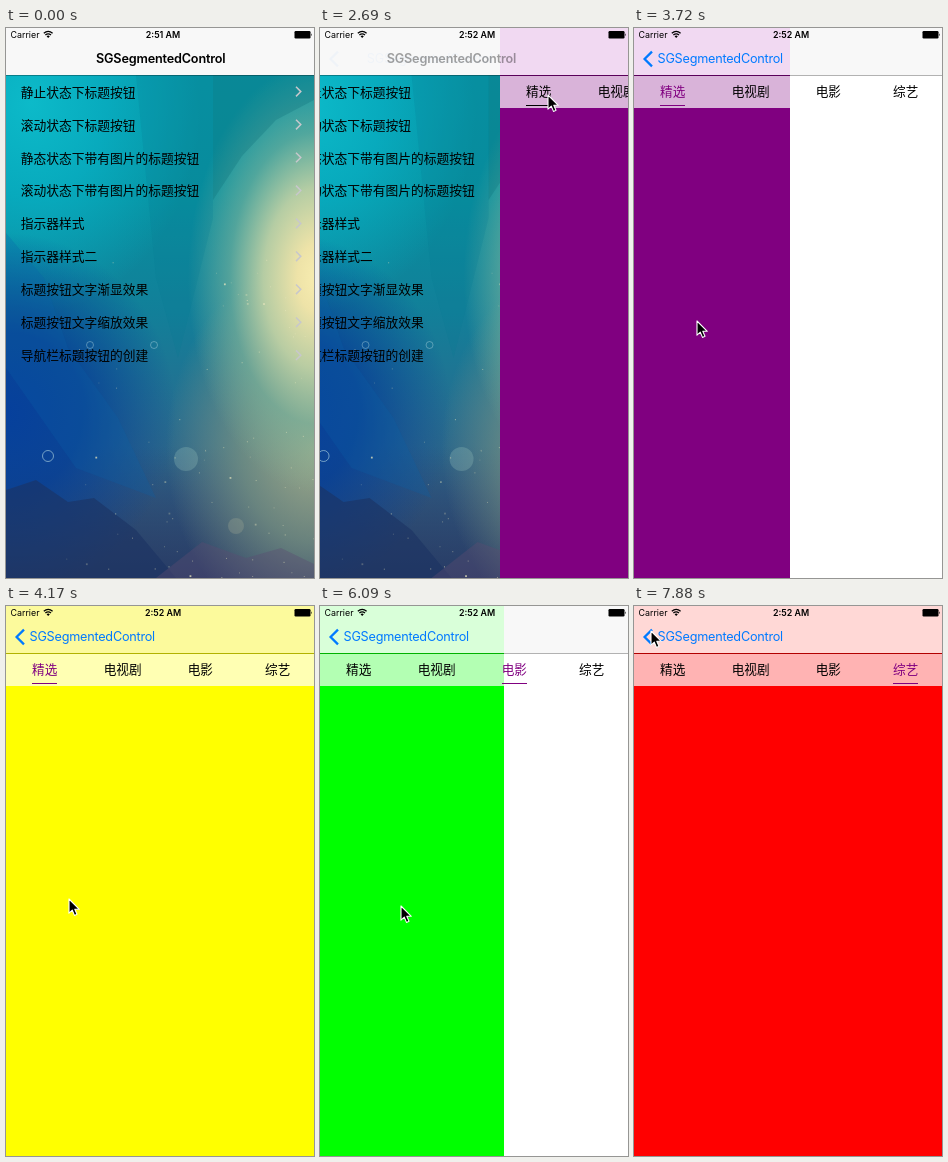
Recreate the animation shown at these times as an HTML page. Size 308 by 550 pixels, loop 8000 ms.

```html
<!DOCTYPE html>
<html lang="zh">
<head>
<meta charset="utf-8">
<title>Segmented control</title>
<style>
html, body { margin: 0; width: 100%; height: 100%; overflow: hidden; background: #fff; }
#stage { position: absolute; left: 0; top: 0; width: 308px; height: 550px; overflow: hidden;
  font-family: Inter, Roboto, sans-serif; color: #000; }
#stage div, #stage svg { position: absolute; white-space: nowrap; }
.full { left: 0; top: 0; width: 308px; height: 550px; }
.cjk { font: 12.75px/20px "Noto Sans CJK SC", "Noto Sans CJK", sans-serif; }
#photo { background:
  radial-gradient(ellipse 130px 215px at 312px 250px, #f8edb0 0, #eee3a8 16%, rgba(190,208,164,.95) 42%, rgba(120,178,155,.65) 68%, rgba(60,150,145,0) 100%),
  radial-gradient(ellipse 150px 190px at 310px 420px, rgba(172,178,138,.9) 0, rgba(125,150,130,.75) 50%, rgba(90,130,130,0) 100%),
  radial-gradient(ellipse 170px 180px at 0 385px, #06409c 0, rgba(6,62,150,.85) 45%, rgba(10,80,150,0) 100%),
  linear-gradient(rgba(30,52,104,0) 76%, rgba(34,52,98,.8) 100%),
  radial-gradient(ellipse 170px 210px at 25px 75px, #0cbac9 0, rgba(8,176,196,.8) 45%, rgba(8,160,180,0) 100%),
  linear-gradient(#0796a6 0, #07909f 30%, #127f99 52%, #266e90 70%, #315e84 85%, #3d5976 100%); }
#list .nav { left: 0; top: 0; width: 308px; height: 47px; background: #f8f8f8; }
#detail { background: #fff; overflow: hidden; }
.page, .page i { position: absolute; width: 308px; }
.page { height: 550px; }
.page i { left: 0; top: 0; height: 47px; }
#strip { left: 0; top: 0; width: 308px; height: 47px; background: #f8f8f8; }
#tabs { left: 0; top: 48px; width: 308px; height: 32px; background: rgba(255,255,255,.7); }
#tabs .cjk { top: 5px; font-size: 12.65px; }
#mark { top: 28.7px; height: 1.5px; background: purple; }
#line { left: 0; top: 47px; width: 308px; height: 1px; background: rgba(0,0,0,.3); }
#title, #back { top: 21px; font-size: 12.65px; line-height: 20px; }
#title { left: 90px; font-weight: 600; letter-spacing: -.17px; }
#back { left: 23.5px; color: #007aff; letter-spacing: -.22px; }
.status { top: 1px; font-size: 8.9px; line-height: 12px; }
</style>
</head>
<body>
<div id="stage">
  <div id="list" class="full">
    <div id="photo" class="full"></div>
    <svg id="art" class="full" viewBox="0 0 308 550">
      <path d="M207 47H308V72L270 92L236 128L207 172Z" fill="#0e6f78" opacity=".3"/>
      <path d="M130 47H207V190L172 330L150 250Z" fill="#067a90" opacity=".2"/>
      <path d="M0 205L38 250L62 320L112 390L150 470L70 440L0 340Z" fill="#0b62a8" opacity=".25"/>
      <path d="M0 462L30 452L62 474L88 470L130 502L170 550H0Z" fill="#1c3263" opacity=".6"/>
      <path d="M150 550L196 514L240 530L275 520L308 536V550Z" fill="#5a4d70" opacity=".4"/>
      <circle cx="180" cy="431" r="12" fill="#9cc4bd" opacity=".28"/>
      <circle cx="230" cy="498" r="8" fill="#b5b89c" opacity=".25"/>
      <g fill="none" stroke="#b8dce4" stroke-opacity=".6">
        <circle cx="42" cy="428" r="5.5"/><circle cx="84" cy="317" r="3.5" stroke-opacity=".4"/><circle cx="148" cy="317" r="3.5" stroke-opacity=".4"/>
      </g>
    </svg>
    <div class="nav"></div>
  </div>
  <div id="detail" class="full">
    <div id="strip"></div>
    <div id="tabs"><div id="mark"></div></div>
  </div>
  <div id="line"></div>
  <div id="title">SGSegmentedControl</div>
  <svg id="chevron" style="left:8px;top:22px" width="12" height="18" fill="none" stroke="#007aff" stroke-width="2.3"><path d="M10 1.6L2.6 9L10 16.4"/></svg>
  <div id="back">SGSegmentedControl</div>
  <div class="status" style="left:4.5px">Carrier</div>
  <svg style="left:37px;top:2px" width="11" height="9" fill="none" stroke="#000" stroke-width="1.3"><path d="M.8 3.3Q5.2 -.6 9.6 3.3M2.4 5.1Q5.2 2.7 8 5.1"/><path d="M3.6 6.2Q5.2 5 6.8 6.2L5.2 8Z" fill="#000" stroke="none"/></svg>
  <div id="clock" class="status" style="left:107px;width:100px;text-align:center;font-weight:600"></div>
  <svg style="left:288px;top:2px" width="19" height="10"><rect x=".5" y="1" width="16" height="7.5" rx="1.2"/><path d="M17.2 3.2Q18.6 4.7 17.2 6.3Z"/></svg>
  <svg id="cursor" style="left:-1px;top:-1px" width="15" height="21" stroke="#fff" stroke-width="1.1" stroke-linejoin="round"><path d="M1 1V15.2L4.3 12.2L6.5 17.4L9 16.3L6.8 11.3H11.3Z"/></svg>
</div>
<script>
const $ = id => document.getElementById(id);
const W = 308, LOOP = 8000, START = 1200, STEP = 148.1;

const rows = ['静止状态下标题按钮', '滚动状态下标题按钮', '静态状态下带有图片的标题按钮',
  '滚动状态下带有图片的标题按钮', '指示器样式', '指示器样式二', '标题按钮文字渐显效果',
  '标题按钮文字缩放效果', '导航栏标题按钮的创建'];
const tabs = [['精选', 26], ['电视剧', 97.7], ['电影', 181.7], ['综艺', 259]];
// body, nav tint once settled, nav tint just after loading, step of loading
const pages = [['#800080', '#f1d9f2', '#f1d9f2', 0], ['#ffff00', '#ffffd6', '#fcfa9c', 20],
  ['#00ff00', '#d9ffd9', '#baffba', 28], ['#ff0000', '#ffd8d6', '#ffbaba', 35]];

// [step, value...] with straight moves between steps
const push = [[9, 0], [10, .416], [11, .86], [12, .985], [13, 1]];
const titleFade = [[9, 1], [10, .36], [11, .05], [12, 0]];
const backFade = [[9, 0], [10, .03], [11, .65], [12, 1]];
const scroll = [[15, 0], [16, 58], [17, 152], [18, 262], [19, 302], [20, 308],
  [25, 308], [26, 430], [27, 612], [28, 616], [32, 616], [33, 740], [34, 890], [35, 924]];
const mark = [[20, 26, 25.3], [21, 84, 35.5], [22, 97.7, 38], [28, 97.7, 38], [29, 160, 29],
  [30, 181.7, 25.3], [34, 181.7, 25.3], [35, 209.7, 25.3], [36, 259, 25.3]];
const pointer = [[1, 320, 120], [2, 301, 111], [4, 265, 92], [6, 234, 71], [7, 228, 67], [10, 228, 67],
  [12, 225, 190], [14, 215, 293], [15, 215, 293], [16, 157, 293], [17, 63, 293], [20, 63, 293],
  [22, 130, 298], [24, 210, 300], [25, 210, 300], [26, 88, 300], [27, -30, 300], [28, -30, 300],
  [29, 60, 300], [31, 205, 300], [32, 205, 300], [33, 81, 300], [34, -30, 300], [36, -30, 250],
  [38, 14, 170], [41, 10, 4], [42, 12, 12], [43, 16, 20], [44, 18, 27], [45, 17, 25]];

function at(keys, n) {
  if (n <= keys[0][0]) return keys[0].slice(1);
  for (let i = 1; i < keys.length; i++) {
    const a = keys[i - 1], b = keys[i];
    if (n <= b[0]) {
      const k = (n - a[0]) / (b[0] - a[0]);
      return a.slice(1).map((v, j) => v + (b[j + 1] - v) * k);
    }
  }
  return keys[keys.length - 1].slice(1);
}

function add(parent, cls, left, top, text = '') {
  const el = document.createElement('div');
  el.className = cls;
  el.style.left = left + 'px';
  if (top !== null) el.style.top = top + 'px';
  el.textContent = text;
  parent.append(el);
  return el;
}

let art = '', seed = 7;
const rnd = () => (seed = seed * 16807 % 2147483647) / 2147483647;
for (let i = 0; i < 85; i++) {
  const x = 60 + rnd() * 248, y = 550 - 330 * rnd() ** 1.4, s = rnd() < .12 ? 1.8 : .9;
  art += `<rect x="${x}" y="${y}" width="${s}" height="${s}" fill="#e9e6bd" opacity="${.25 + rnd() * .55}"/>`;
}
rows.forEach((text, i) => {
  const y = 63.6 + i * 32.95;
  add($('list'), 'cjk', 14.7, y - 10, text);
  art += `<path d="M290 ${y - 4.8}l4.8 4.8l-4.8 4.8" fill="none" stroke="#c7c7cc" stroke-width="1.5"/>`;
});
$('art').insertAdjacentHTML('beforeend', art);

const pageEls = pages.map(([body]) => {
  const el = add($('detail'), 'page', 0, 0);
  el.style.background = body;
  el.append(document.createElement('i'));
  $('detail').insertBefore(el, $('tabs'));
  return el;
});
const tabEls = tabs.map(([text, x]) => add($('tabs'), 'cjk', x, null, text));

const shift = (el, x, y = 0) => { el.style.transform = `translate(${x}px,${y}px)`; };

function draw(t) {
  const n = Math.floor((t - START) / STEP);
  const [p] = at(push, n), [offset] = at(scroll, n), [mx, mw] = at(mark, n), [cx, cy] = at(pointer, n);
  const [shown] = at(backFade, n);
  $('clock').textContent = n < 0 ? '2:51 AM' : '2:52 AM';
  shift($('list'), -.3 * W * p);
  shift($('detail'), Math.round(W * (1 - p)));
  shift($('title'), -56 * p);
  $('title').style.opacity = at(titleFade, n)[0];
  shift($('back'), 40 * (1 - p));
  $('back').style.opacity = shown;
  $('chevron').style.opacity = shown;
  pages.forEach(([, calm, fresh, load], i) => {
    const el = pageEls[i];
    shift(el, i * W - offset);
    el.style.visibility = n >= load ? 'visible' : 'hidden';
    el.firstChild.style.background = n < load + 2 ? fresh : calm;
  });
  const active = n < 12 ? -1 : n < 22 ? 0 : n < 30 ? 1 : n < 36 ? 2 : 3;
  tabEls.forEach((el, i) => { el.style.color = i === active ? 'purple' : '#000'; });
  $('mark').style.background = active < 0 ? '#000' : 'purple';
  $('mark').style.left = mx + 'px';
  $('mark').style.width = mw + 'px';
  shift($('cursor'), cx, cy);
}

function tick() {
  draw(performance.now() % LOOP);
  requestAnimationFrame(tick);
}
tick();
</script>
</body>
</html>
```
